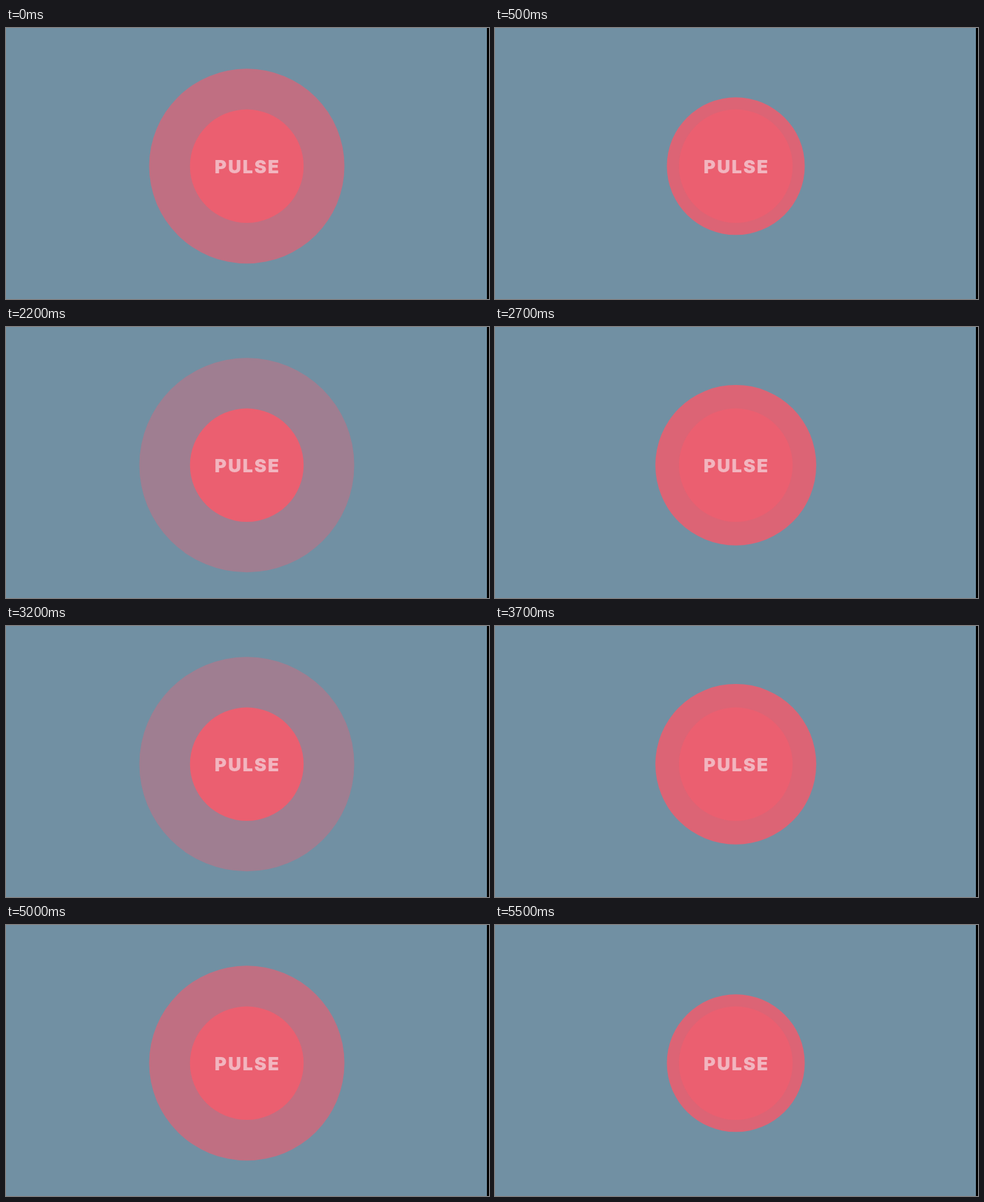
An HTML page for the animation above (5600 ms loop, 690 by 388 pixels).

```html
<!DOCTYPE html>
<html lang="en">
<head>
<meta charset="utf-8">
<title>Pulse</title>
<style>
  html, body {
    margin: 0;
    width: 100%;
    height: 100%;
    overflow: hidden;
    background: #7190a3;
  }
  svg {
    display: block;
    width: 100vw;
    height: 100vh;
  }
  .disc { fill: #eb5f70; }
  text {
    font: 900 26px Inter, "Liberation Sans", sans-serif;
    letter-spacing: 2px;
    text-anchor: middle;
    fill: #f2b5bf;
  }
</style>
</head>
<body>
<svg viewBox="0 0 690 388">
  <rect width="690" height="388" fill="#7190a3"/>
  <circle id="ring" class="disc" cx="344" cy="197.8" r="139.5" opacity=".65"/>
  <circle class="disc" cx="344" cy="197.8" r="81.2"/>
  <text x="345" y="207.7">PULSE</text>
  <rect x="687" width="3" height="388" fill="#000"/>
</svg>
<script>
  const LOOP = 5600, STEP = 100, BEAT = 1000;
  const ring = document.getElementById('ring');

  // Steady growth that slows down near the end of the beat.
  const radius = u => 98.5 + 82 * u - 107 * Math.max(0, u - 0.55) ** 2;
  // Slow fade at first, then faster until nothing is left.
  const opacity = u => 0.9 * Math.cos(1.91 * (u - 0.1));

  function draw() {
    const time = Math.floor(((performance.now() + 4) % LOOP) / STEP) * STEP;
    const u = ((time + BEAT / 2) % BEAT) / BEAT;
    ring.setAttribute('r', radius(u));
    ring.setAttribute('opacity', Math.max(0, opacity(u)));
    requestAnimationFrame(draw);
  }
  draw();
</script>
</body>
</html>
```
